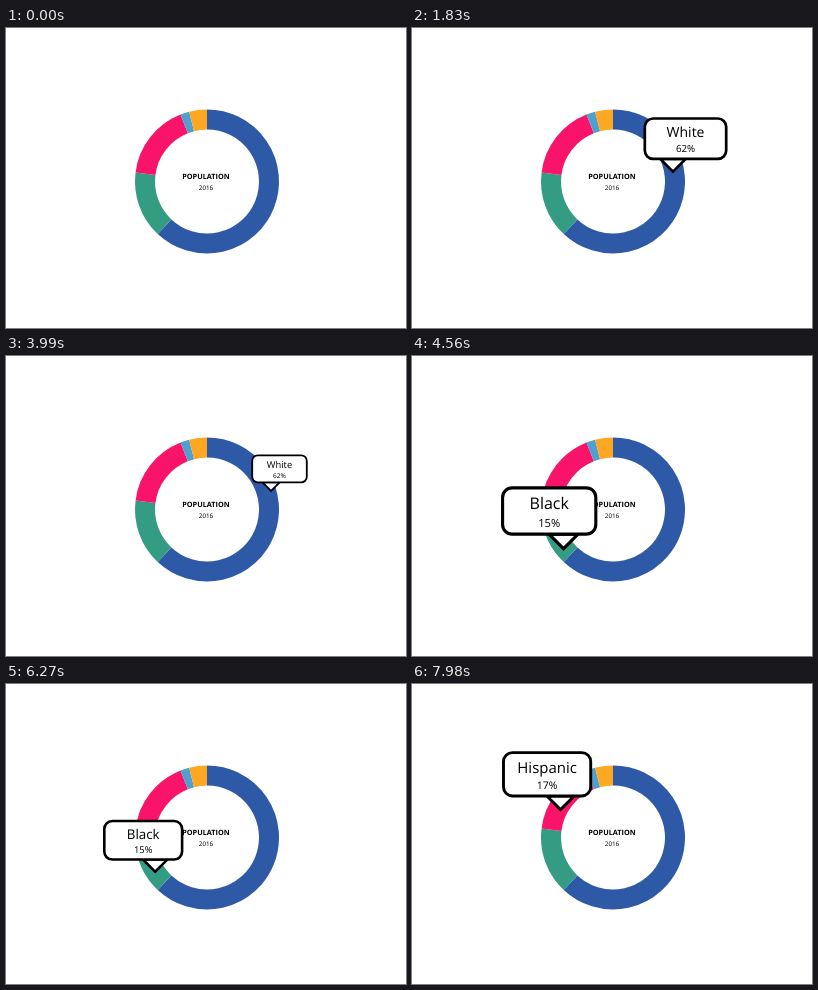
These frames come from a looping animation (400x300 px, 8 s). An HTML page:

```html
<!DOCTYPE html>
<html lang="en">
<head>
<meta charset="utf-8">
<title>Population 2016</title>
<style>
  html, body { margin: 0; width: 100%; height: 100%; overflow: hidden; background: #fff; }
  svg { display: block; width: 100vw; height: 100vh; }
  text { font-family: "Open Sans", "Noto Sans", sans-serif; text-anchor: middle; text-rendering: geometricPrecision; }
  .box { fill: #fff; stroke: #000; stroke-width: 2.6; }
</style>
</head>
<body>
<svg viewBox="0 0 400 300">
  <g id="ring" fill="none" stroke-width="20"></g>
  <text x="200" y="150.6" font-size="7.3" font-weight="700">POPULATION</text>
  <text x="200" y="161.8" font-size="6.3">2016</text>
  <g id="bubble">
    <path id="pointer" class="box" d="M-12.2 13H12.2L0 25.2Z"/>
    <rect class="box" x="-39" y="-25.7" width="78" height="38.7" rx="8"/>
    <text id="label" y="-7.8" font-size="13.4"></text>
    <text id="share" y="6.8" font-size="9.4"></text>
  </g>
</svg>
<script>
  const LOOP = 8000, STEP = 30;            // ms
  const FIRST = 30, CYCLE = 110, RAMP = 10; // in steps
  const CENTER = { x: 201, y: 153.5 }, RADIUS = 62;

  const slices = [
    ['#2e59a7', 62], ['#349c82', 15], ['#fa1469', 17], ['#4f9fcf', 2], ['#fea723', 4],
  ];
  const callouts = [
    { label: 'White', share: '62%', x: 273.5, y: 117.3, tip: -12 },
    { label: 'Black', share: '15%', x: 137.2, y: 162.6, tip: 12 },
    { label: 'Hispanic', share: '17%', x: 135.1, y: 97.4, tip: 12 },
  ];
  const byId = id => document.getElementById(id);

  function ringPoint(percent) {
    const angle = percent / 50 * Math.PI;
    return `${CENTER.x + RADIUS * Math.sin(angle)} ${CENTER.y - RADIUS * Math.cos(angle)}`;
  }

  let start = 0;
  for (const [color, percent] of slices) {
    const arc = document.createElementNS('http://www.w3.org/2000/svg', 'path');
    const large = percent > 50 ? 1 : 0;
    arc.setAttribute('d', `M${ringPoint(start)}A${RADIUS} ${RADIUS} 0 ${large} 1 ${ringPoint(start + percent)}`);
    arc.setAttribute('stroke', color);
    byId('ring').append(arc);
    start += percent;
  }

  // Linear growth, damped overshoot, linear shrink.
  function scaleAt(step) {
    if (step < RAMP) return step / RAMP;
    if (step > CYCLE - RAMP) return (CYCLE - step) / RAMP;
    const s = (step - RAMP) / 30;
    return 1 + 0.3 * Math.sin(4 * Math.PI * s) * Math.exp(-2 * s);
  }

  const bubble = byId('bubble');
  let current = null;

  function draw(time) {
    const step = Math.floor(time % LOOP / STEP) - FIRST;
    const scale = step > 0 ? scaleAt(step % CYCLE) : 0;
    bubble.style.display = scale > 0 ? '' : 'none';
    if (scale <= 0) return;
    const callout = callouts[Math.floor(step / CYCLE)];
    if (callout !== current) {
      current = callout;
      byId('label').textContent = callout.label;
      byId('share').textContent = callout.share;
      byId('pointer').setAttribute('transform', `translate(${callout.tip})`);
    }
    bubble.setAttribute('transform', `translate(${callout.x} ${callout.y}) scale(${scale})`);
  }

  const origin = performance.now();
  function tick() {
    draw(performance.now() - origin);
    requestAnimationFrame(tick);
  }
  tick();
</script>
</body>
</html>
```
